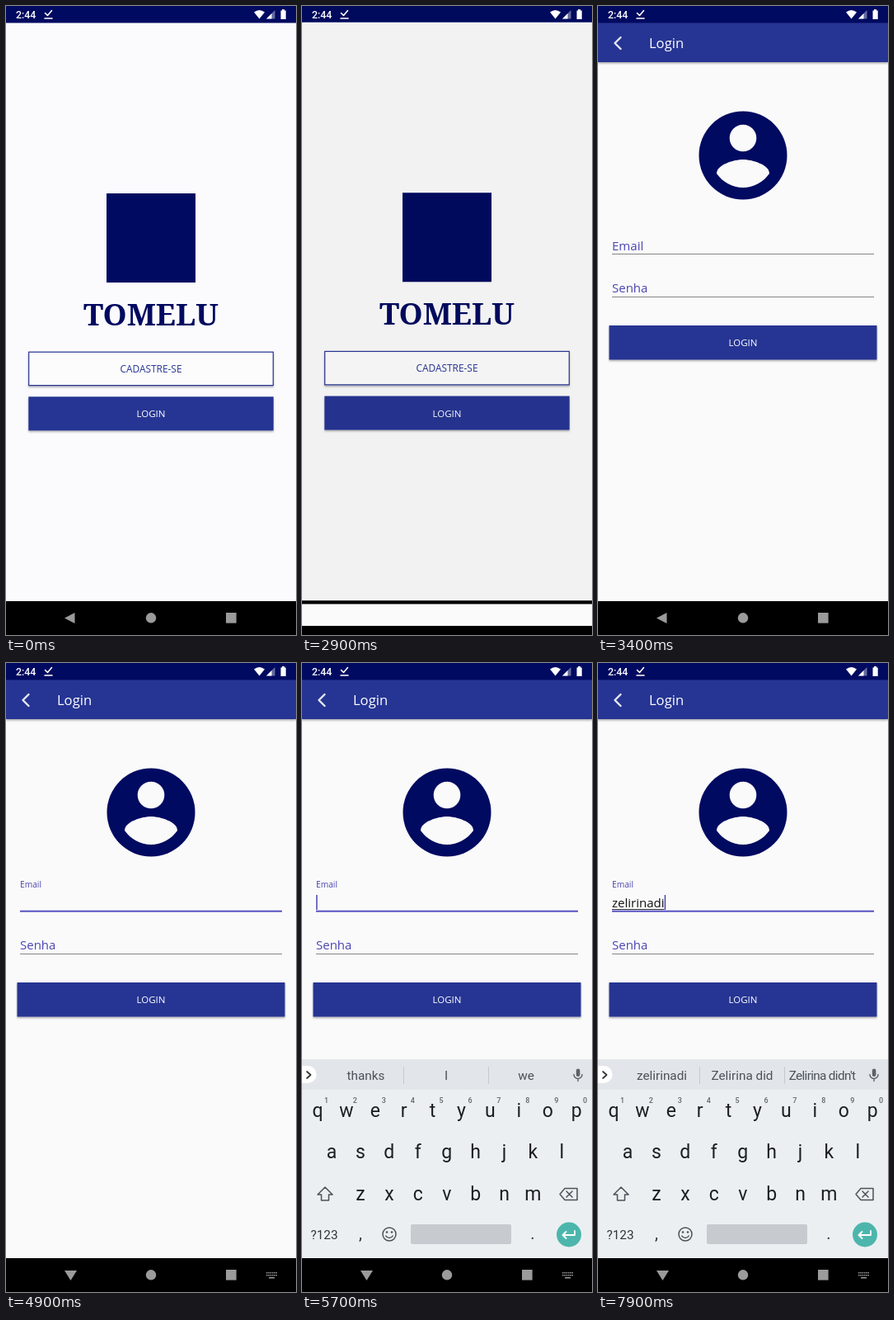
These frames come from a looping animation (352 px wide and 762 px high, 8000 ms). An HTML page:

```html
<!DOCTYPE html>
<html lang="pt">
<head>
<meta charset="utf-8">
<title>Login</title>
<style>
  html, body { margin: 0; width: 100%; height: 100%; overflow: hidden; background: #000; }
  svg { display: block; width: 100vw; height: 100vh; }
  text { font-family: "Open Sans", "Noto Sans", sans-serif; }
  .mid { text-anchor: middle; }
  .label { fill: #4a45b0; font-size: 15px; }
  .brand { font: bold 37px "Noto Serif", serif; fill: #000a60; }
  .white { fill: #fff; }
  .button { font-weight: 500; }
  .roboto text { font-family: Roboto, sans-serif; }
  .key { font-size: 23px; fill: #1b1f23; }
  .digit { font-size: 9px; font-weight: 500; fill: #5f666c; }
  .sug { font-size: 15.3px; fill: #4b5258; }
  .line { fill: none; stroke-linecap: round; stroke-linejoin: round; }
</style>
</head>
<body>
<svg viewBox="0 0 352 762" preserveAspectRatio="none">
  <defs>
    <clipPath id="reveal"><rect id="revealBox" width="352" height="762"/></clipPath>
    <clipPath id="aboveNav"><rect width="352" height="721"/></clipPath>
    <filter id="shade" x="-5%" y="-20%" width="110%" height="150%">
      <feDropShadow dx="0" dy="1.6" stdDeviation="0.8" flood-color="#000" flood-opacity=".32"/>
    </filter>
  </defs>

  <g id="home">
    <rect width="352" height="762" fill="#fafafa"/>
    <rect id="tint" width="352" height="762" fill="#fdfdff"/>
    <rect y="-20" width="352" height="40.5" fill="#000a60"/>
    <rect x="122" y="227" width="108" height="108" fill="#000a60"/>
    <text class="mid brand" x="176" y="386.5">TOMELU</text>
    <rect x="27.7" y="419.2" width="296.6" height="40.4" fill="#fcfcfc" stroke="#283593" stroke-width="1.2" filter="url(#shade)"/>
    <text class="mid button" x="176" y="444" font-size="11.9" fill="#283593">CADASTRE-SE</text>
    <rect x="27.3" y="473.3" width="297.4" height="41" fill="#283593" filter="url(#shade)"/>
    <text class="mid button white" x="176" y="498.3" font-size="11.5">LOGIN</text>
    <rect y="721" width="352" height="70" fill="#000"/>
    <rect id="dim" width="352" height="721" fill="#000"/>
  </g>

  <g id="loginWrap" clip-path="url(#reveal)">
    <g id="login">
      <rect width="352" height="762" fill="#fafafa"/>
      <rect y="-20" width="352" height="41" fill="#000a60"/>
      <rect y="20.5" width="352" height="47.5" fill="#283593" filter="url(#shade)"/>
      <path class="line" d="M27.500 38L20.500 45L27.500 52" stroke="#e6e7f3" stroke-width="2.4"/>
      <text class="white" x="62" y="50.800" font-size="16.6">Login</text>
      <circle cx="176" cy="181" r="53.5" fill="#000a60"/>
      <circle cx="176" cy="160" r="16.3" fill="#fafafa"/>
      <path d="M144 203C144 192 165.500 186 176 186S208 192 208 203C201 213 189 220 176 220S151 213 144 203Z" fill="#fafafa"/>
      <rect x="17" y="300" width="318" height="1" fill="#858585"/>
      <rect id="focus" x="17" y="299.7" width="318" height="2" fill="#5550c2"/>
      <text id="email" class="label" x="17">Email</text>
      <text id="typed" x="17" y="295.500" font-size="15" fill="#111"></text>
      <rect id="under" x="17" y="298" height="1" fill="#333"/>
      <rect id="caret" y="281" width="1.5" height="18" fill="#4a45b0"/>
      <text class="label" x="17" y="347.3">Senha</text>
      <rect x="17" y="352" width="318" height="1" fill="#858585"/>
      <rect x="13.500" y="387" width="325" height="41.5" fill="#283593" filter="url(#shade)"/>
      <text class="mid button white" x="176" y="412.3" font-size="11.5">LOGIN</text>
      <rect y="721" width="352" height="41" fill="#000"/>
    </g>
  </g>

  <g clip-path="url(#aboveNav)"><g id="board" class="roboto">
    <rect y="480" width="352" height="242" fill="#eceff2"/>
    <rect y="480" width="352" height="37" fill="#e2e5e9"/>
    <path d="M123.500 489V510M226.500 489V510" stroke="#c6cacf"/>
    <path d="M0 488H7A10.500 10.500 0 0 1 7 509H0Z" fill="#fff"/>
    <path class="line" d="M6 495L10.500 499L6 503" stroke="#333" stroke-width="1.7"/>
    <rect x="332.800" y="491.500" width="4.600" height="9.500" rx="2.3" fill="#5b6268"/>
    <path class="line" d="M330 498.500A5 5 0 0 0 340 498.500M335 503.500V506.500" stroke="#5b6268" stroke-width="1.4"/>
    <g id="sugs"></g>
    <g id="keys"></g>
    <g class="line" stroke="#4b5258" stroke-width="1.5">
      <path d="M28 635L37 644H32.500V651H23.500V644H19Z"/>
      <path d="M319 636.500H334V650.500H319L313 643.500ZM321 640L328 647M328 640L321 647"/>
      <circle cx="106" cy="692" r="8"/>
      <path d="M101.800 694A4.800 4.800 0 0 0 110.200 694"/>
    </g>
    <circle cx="103" cy="689.500" r="1.3" fill="#4b5258"/>
    <circle cx="109" cy="689.500" r="1.3" fill="#4b5258"/>
    <text x="10.500" y="697.500" font-size="15.3" fill="#2f353a">?123</text>
    <text class="mid" x="71" y="698" font-size="20" fill="#2f353a">,</text>
    <rect x="132" y="680" width="122" height="24" rx="2" fill="#c7cbd0"/>
    <text class="mid" x="280" y="698" font-size="20" fill="#2f353a">.</text>
    <circle cx="324" cy="692.500" r="15" fill="#4db6ac"/>
    <path class="line" d="M331 688V693H317M320.500 689L316.500 693L320.500 697" stroke="#fff" stroke-width="1.8"/>
  </g></g>

  <g id="nav" fill="#9b9b9b">
    <path id="back"/>
    <circle cx="176" cy="741.300" r="6.200"/>
    <rect x="267" y="735" width="12.600" height="12.600"/>
    <g id="dots"></g>
  </g>

  <g class="roboto" fill="#fff">
    <text x="12" y="15" font-size="12.4" font-weight="500">2:44</text>
    <path class="line" d="M47.500 8.500L50.500 11.500L55.500 5.500M47 15H56" stroke="#fff" stroke-width="1.6"/>
    <path d="M301 7.500Q307.500 2.500 314 7.500L307.500 15.500Z"/>
    <path d="M326.500 5V15.500H316Z" opacity=".4"/>
    <path d="M322.500 9V15.500H316Z"/>
    <path d="M333.500 5.500H335V4H338V5.500H339.700V16H333.500Z"/>
  </g>
</svg>

<script>
const LOOP = 8000, STEP = 100;
const NAME = "zelirinadi";
const KEY_TIMES = [5900, 6400, 6500, 6700, 6900, 7100, 7400, 7500, 7800, 7900];
// middle and right suggestions, from a given number of typed letters on
const WORDS = [
  [0, "I", "we"], [1, "zoo", "zone"], [2, "zero", "zen"], [3, "zeal", "zest"],
  [4, "Zelirina", "zeal"], [6, "Zelirina", "Zelirina's"],
  [9, "Zelirina d", "Zelirina do"], [10, "Zelirina did", "Zelirina didn't"]
];

const $ = id => document.getElementById(id);
const set = (id, attrs) => {
  for (const k in attrs) $(id).setAttribute(k, attrs[k]);
};
const show = (id, on) => set(id, { visibility: on ? "visible" : "hidden" });
const shift = (id, y) => set(id, { transform: `translate(0 ${y})` });

// linear track through [time, value] points
function track(t, points) {
  if (t <= points[0][0]) return points[0][1];
  for (let i = 1; i < points.length; i++) {
    const [t0, a] = points[i - 1], [t1, b] = points[i];
    if (t <= t1) return a + (b - a) * (t - t0) / (t1 - t0);
  }
  return points[points.length - 1][1];
}

function buildKeys() {
  const rows = [["qwertyuiop", 19, 550], ["asdfghjkl", 36, 600], ["zxcvbnm", 71, 651]];
  let out = "";
  rows.forEach(([letters, x0, y], row) => [...letters].forEach((c, i) => {
    const x = x0 + i * 34.9;
    out += `<text class="mid key" x="${x}" y="${y}">${c}</text>`;
    if (!row) out += `<text class="mid digit" x="${x + 10.5}" y="533">${(i + 1) % 10}</text>`;
  }));
  $("keys").innerHTML = out;
  $("sugs").innerHTML = [77.5, 175, 272]
    .map((x, i) => `<text id="sug${i}" class="mid sug" x="${x}" y="504.500"></text>`).join("");

  let dots = '<rect x="319" y="744" width="7" height="1.5"/>';
  for (let i = 0; i < 12; i++)
    dots += `<rect x="${316 + i % 6 * 2.3}" y="${738 + Math.floor(i / 6) * 3}" width="1.5" height="1.5"/>`;
  $("dots").innerHTML = dots;
}

// the new screen is uncovered from the bottom while both screens drift up
function drawTransition(t) {
  const move = track(t, [[2800, 0], [2900, 0.05], [3000, 0.45], [3100, 0.81], [3200, 0.94], [3300, 0.98], [3400, 1]]);
  const edge = track(t, [[2900, 724.5], [3000, 300], [3100, 35.5], [3200, 6], [3300, 0]]);
  set("tint", { opacity: track(t, [[0, 0.7], [900, 0]]) });
  shift("home", -15.2 * move);
  shift("login", 31.5 * (1 - move));
  set("dim", { opacity: track(t, [[2800, 0], [2900, 0.032], [3000, 0.08], [3100, 0.11]]) });
  set("revealBox", { y: edge });
  show("loginWrap", t >= 2900);
  show("nav", t < 2900 || t >= 3000);
}

function drawField(t) {
  const count = KEY_TIMES.filter(k => t >= k).length;
  const text = NAME.slice(0, count);
  const rise = track(t, [[4400, 0], [4600, 1]]);
  set("focus", { opacity: track(t, [[4000, 0], [4300, 1]]) });
  set("email", { y: 295.5 - rise * 23.7 });
  $("email").style.fontSize = 15 - rise * 4.8 + "px";
  $("typed").textContent = text;
  const width = count ? $("typed").getComputedTextLength() : 0;
  set("under", { width });
  const blinkOn = (t >= 4500 && t < 4900) || t >= 5400;
  set("caret", { x: 17.2 + width, opacity: blinkOn ? 1 : 0 });
  return { count, text };
}

function drawKeyboard(t, { count, text }) {
  const open = t >= 4900;
  set("back", { d: open ? "M71 736H86L78.500 748Z" : "M83.500 735V748L71 741.500Z" });
  set("dots", { opacity: open ? 1 : 0 });
  shift("board", track(t, [[5100, 242], [5200, 190], [5300, 75], [5400, 16], [5500, 0]]));
  show("board", t >= 5200);
  const words = WORDS.filter(w => count >= w[0]).pop();
  [text || "thanks", words[1], words[2]].forEach((word, i) => {
    const el = $("sug" + i);
    el.textContent = word;
    el.style.letterSpacing = word.length > 12 ? "-0.65px" : "0";
  });
}

function draw(ms) {
  const t = Math.floor(ms % LOOP / STEP) * STEP;
  drawTransition(t);
  drawKeyboard(t, drawField(t));
}

buildKeys();
const start = performance.now();
function tick() {
  draw(performance.now() - start);
  requestAnimationFrame(tick);
}
tick();
</script>
</body>
</html>
```
